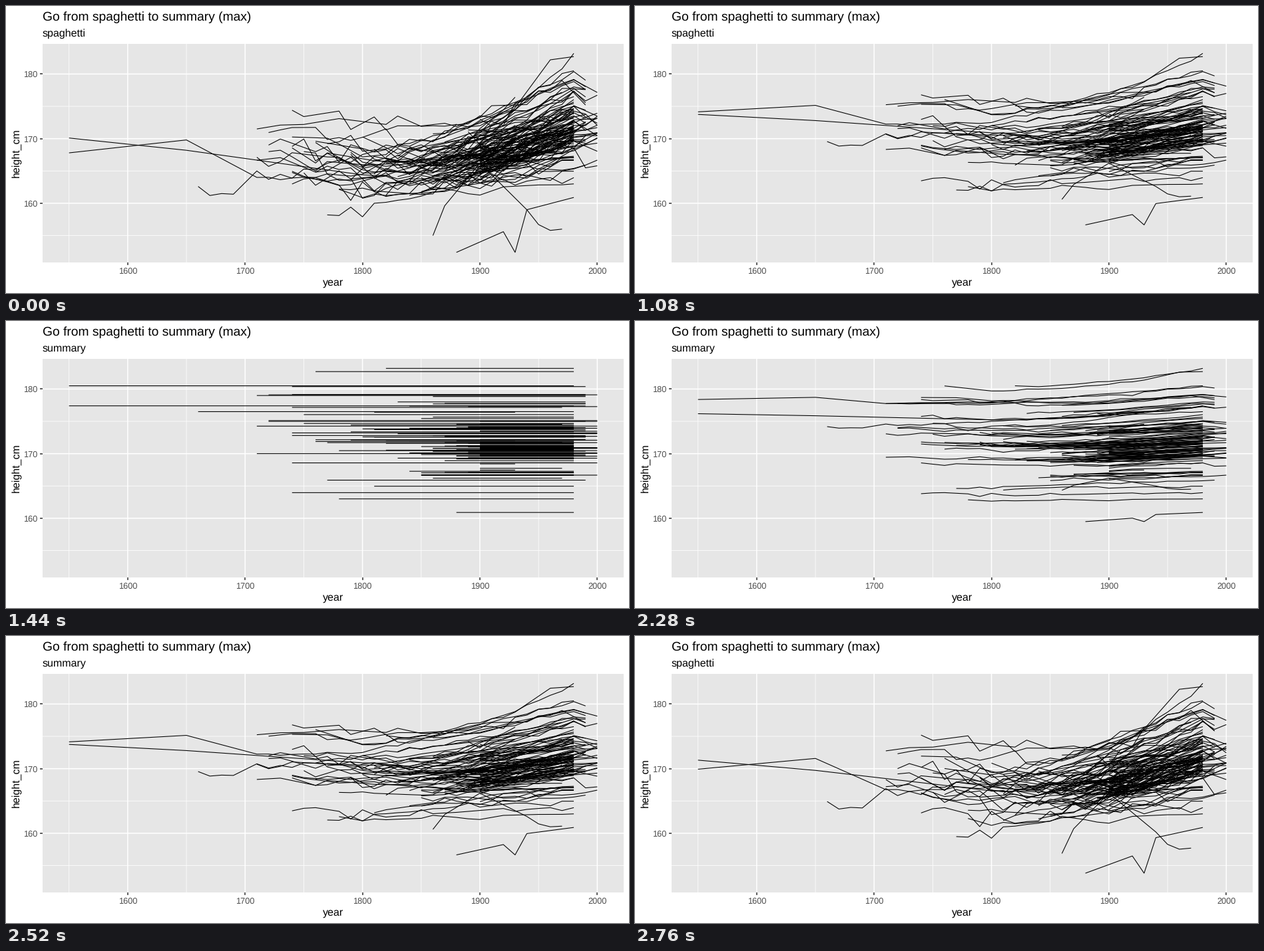
Write a matplotlib script that moves like this. It is 936x432 px and loops after 2.88 s.

```python
import numpy as np
import matplotlib.pyplot as plt
from matplotlib.animation import FuncAnimation
from matplotlib.collections import LineCollection

W, H = 936, 432
LEFT, RIGHT, TOP, BOTTOM = 55, 928, 57, 386
HOLD, STEPS, TICK_MS = 7, 6, 120
N_FRAMES = 24
N_CROWD = 116

plt.rcParams.update({
    "font.family": "Liberation Sans",
    "text.hinting": "none",
    "path.snap": False,
})

rng = np.random.default_rng(5)

# Lines that stand apart from the crowd, as year: height points.
KEY_LINES = [
    {1550: 170.1, 1650: 168.2, 1800: 164.4, 1870: 166, 1980: 177.4},
    {1550: 167.8, 1650: 169.8, 1710: 164, 1800: 164.5, 1980: 180.5},
    {1660: 162.6, 1670: 161.2, 1680: 161.5, 1690: 161.4, 1710: 165,
     1720: 163.7, 1980: 176.5},
    {1710: 171.5, 1730: 172.1, 1750: 172.2, 1780: 173.1, 1820: 172.2,
     1830: 173.5, 1850: 171.9, 1900: 172, 1970: 179, 1990: 175.2},
    {1760: 169.4, 1800: 164.7, 1870: 168, 1930: 174.8, 1960: 182.2, 1980: 182.7},
    {1820: 167, 1840: 166.2, 1900: 171, 1970: 180.8, 1980: 183.2},
    {1770: 158.2, 1780: 158.1, 1790: 159.4, 1800: 157.9, 1810: 160, 1990: 165.9},
    {1880: 152.4, 1920: 155.6, 1930: 152.4, 1940: 159, 1980: 160.9},
    {1860: 155, 1870: 159.6, 1900: 166.2, 1940: 159, 1950: 156.7,
     1960: 155.8, 1970: 156},
]


def key_line(points):
    """Join the points, adding uneven decades to the long late gaps."""
    years, heights = list(points), list(points.values())
    out = []
    for a, b in zip(years, years[1:]):
        out.append((a, points[a]))
        if a >= 1710 and b - a > 40:
            for year in range(a + 10, b, 10):
                h = np.interp(year, years, heights) + rng.normal(0, 0.4)
                out.append((year, min(h, max(heights))))
    out.append((years[-1], heights[-1]))
    return np.array(out, float)


def crowd_line():
    """Sink until about 1800, stay low, then climb to the tallest decade."""
    first = 1900 - 10 * int(20 * rng.random() ** 2.4)
    last = rng.choice([1980, 1990, 2000, 1970, 1930],
                      p=[0.52, 0.12, 0.24, 0.06, 0.06])
    age = np.sqrt((1900 - first) / 200)
    top = np.clip(rng.normal(171 + 2 * age, 2.3 + 2 * age), 163, 180.4)
    peak = last if top < 174 and rng.random() < 0.6 else min(last, 1980)

    low = 165 + 0.35 * (top - 171) + rng.normal(0, 1.8)
    low = np.clip(low, 159, top - 1.5)
    years = np.arange(first, last + 1, 10)
    rise = np.clip((years - 1835) / (peak - 1835), 0, 1) ** 1.5
    early = np.clip((1800 - years) / 60, 0, 1)
    h = low + (top - low) * rise + 1.8 * early
    h += rng.normal(0, 0.6 + 0.4 * (years < 1830))
    h -= 0.1 * np.maximum(years - peak, 0)
    h = np.minimum(h, top)
    h[years == peak] = top

    keep = rng.random(len(years)) > 0.25
    keep[[0, -1]] = True
    keep[years == peak] = True
    return np.column_stack([years, h])[keep]


lines = [key_line(p) for p in KEY_LINES]
lines += [crowd_line() for _ in range(N_CROWD)]

fig = plt.figure(figsize=(W / 72, H / 72), dpi=72, facecolor="white")
ax = fig.add_axes([LEFT / W, 1 - BOTTOM / H, (RIGHT - LEFT) / W, (BOTTOM - TOP) / H])
ax.set_facecolor("#e6e6e6")
ax.set_xlim(1527.5, 2022.5)
ax.set_ylim(150.84, 184.67)
ax.set_axisbelow(True)
for spine in ax.spines.values():
    spine.set_visible(False)
ax.set_xticks(range(1600, 2001, 100))
ax.set_yticks([160, 170, 180])
ax.set_xticks(range(1550, 2000, 100), minor=True)
ax.set_yticks([155, 165, 175], minor=True)
ax.grid(which="major", color="white", lw=1.55)
ax.grid(which="minor", color="white", lw=0.78)
ax.tick_params(which="minor", length=0)
ax.tick_params(which="major", length=4, width=1.55, pad=3.2, color="#333333",
               labelsize=12.8, labelcolor="#4d4d4d")


def label(x, y, text, size, **kw):
    return fig.text(x / W, 1 - y / H, text, fontsize=size, color="black",
                    va="baseline", rotation_mode="anchor", **kw)


label(55, 22, "Go from spaghetti to summary (max)", 19.2)
subtitle = label(55, 46, "spaghetti", 16)
label(491.5, 420.7, "year", 16, ha="center")
label(19.5, 221.5, "height_cm", 16, ha="center", rotation=90)

strands = LineCollection([], colors="black", linewidths=1.07, zorder=3)
ax.add_collection(strands, autolim=False)


def progress(i):
    """Steps from 0 to 6 in the first half of the loop, back in the second."""
    half = N_FRAMES // 2
    step = max(i % half - HOLD + 1, 0)
    return step if i < half else STEPS - step


def flatten(line, p):
    x, y = line.T
    return np.column_stack([x, y + (y.max() - y) * p])


def draw(i):
    step = progress(i)
    strands.set_segments([flatten(line, step / STEPS) for line in lines])
    # At the midpoint the label still belongs to the state being left.
    going_back = i >= N_FRAMES // 2
    summary = step + going_back > STEPS // 2
    subtitle.set_text("summary" if summary else "spaghetti")
    return strands, subtitle


anim = FuncAnimation(fig, draw, frames=N_FRAMES, interval=TICK_MS,
                     repeat=True, repeat_delay=0, blit=False)
plt.show()
```
